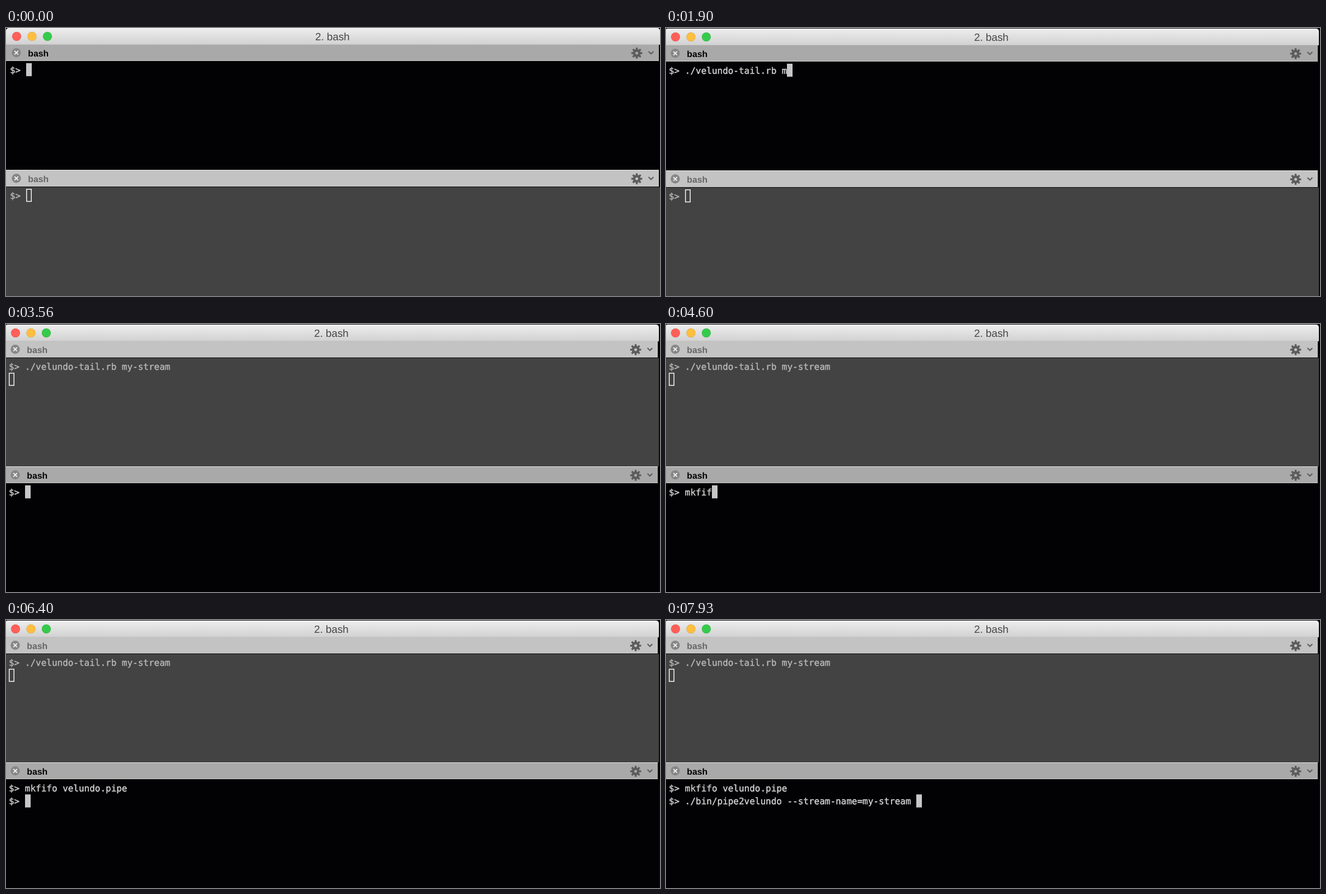
These frames come from a looping animation (1168 px wide and 480 px high, 8 s). An HTML page:

```html
<!DOCTYPE html>
<html lang="en">
<head>
<meta charset="utf-8">
<title>Terminal</title>
<style>
  html, body { margin: 0; width: 100%; height: 100%; overflow: hidden; background: #06070f; }
  svg { display: block; width: 1168px; height: 480px; }
  text { white-space: pre; text-rendering: geometricPrecision; }
  .title { font: 18.8px "Liberation Sans", Arial, sans-serif; fill: #464646; text-anchor: middle; }
  .label { font: bold 15.8px "Liberation Sans", Arial, sans-serif; fill: #666; }
  .line {
    font: 16px "DejaVu Sans Mono", monospace; letter-spacing: -0.02px;
    fill: #b9b9b9; stroke: #b9b9b9; stroke-width: 0.35;
  }
  .bg { fill: #434343; }
  .bar { fill: #c3c3c3; }
  .edge { fill: #c3c3c3; }
  .rule { fill: #0c0c0c; }
  .cursor { fill: none; stroke: #f4f4f4; stroke-width: 1.5; }
  .gear, .chevron { stroke: #5c5c5c; fill: none; }
  .active .bg { fill: #020204; }
  .active .bar { fill: #a9a9a9; }
  .active .edge { fill: #cfcfcf; }
  .active .label { fill: #000; }
  .active .line { fill: #d6d6d6; stroke: #d6d6d6; }
  .active .cursor { fill: #c7c7c7; stroke: #c7c7c7; }
</style>
</head>
<body>
<svg viewBox="0 0 1168 480">
  <defs>
    <linearGradient id="chrome" x2="0" y2="1">
      <stop offset="0" stop-color="#eeeeee"/>
      <stop offset="1" stop-color="#d1d1d1"/>
    </linearGradient>
  </defs>
  <g id="window">
    <g id="panes"></g>
    <path d="M-2 31V6a5 5 0 0 1 5-5H1161a5 5 0 0 1 5 5V31Z" fill="url(#chrome)"/>
    <path d="M3 1.5H1161" stroke="#f7f7f7"/>
    <path d="M-2 30.5H1166" stroke="#c4c4c4"/>
    <g id="lights"></g>
    <text class="title" x="581" y="22.5">2. bash</text>
  </g>
</svg>
<script>
const LOOP = 8000, CELL = 9.6, LEFT = 5, ROW = 23.4;
const NS = 'http://www.w3.org/2000/svg';

function add(parent, tag, attrs = {}, text = '') {
  const node = document.createElementNS(NS, tag);
  for (const key in attrs) node.setAttribute(key, attrs[key]);
  node.textContent = text;
  return parent.appendChild(node);
}

function makePane(top, height) {
  const g = add(document.getElementById('panes'), 'g', { transform: `translate(0 ${top})` });
  const rect = (cls, y, h, w = 1168) => add(g, 'rect', { class: cls, x: -2, y, width: w, height: h });
  rect('bg', 29, height - 29);
  add(g, 'rect', { x: 1164, y: -1, width: 4, height: 30, fill: '#000' });
  rect('bar', 0, 28, 1166);
  rect('edge', 28, 1, 1166);
  rect('rule', 29, 1);
  add(g, 'rect', { x: -2, y: -1, width: 1166, height: 1, fill: '#e6e6e6' });

  add(g, 'circle', { cx: 16.5, cy: 14.3, r: 8.2, fill: '#868686' });
  add(g, 'path', { d: 'M13.2 11l6.6 6.6m0-6.6l-6.6 6.6', stroke: '#ededed', 'stroke-width': 2 });
  add(g, 'text', { class: 'label', x: 37.3, y: 20.5 }, 'bash');

  const gear = add(g, 'g', { class: 'gear', transform: 'translate(1124.5 15)' });
  add(gear, 'circle', { r: 4.7, 'stroke-width': 4.4 });
  for (let i = 0; i < 8; i++)
    add(gear, 'path', { d: 'M0-6V-9.8', 'stroke-width': 3.4, transform: `rotate(${i * 45})` });
  add(g, 'path', { class: 'chevron', d: 'M1145.6 12l4.4 4.2 4.4-4.2', 'stroke-width': 2.1 });

  const lines = [0, 1].map(row => add(g, 'text', { class: 'line', x: LEFT, y: 51 + row * ROW }));
  const cursor = add(g, 'rect', { class: 'cursor', width: 8.5, height: 21.8 });

  return (active, rows, column, row) => {
    g.setAttribute('class', active ? 'active' : '');
    lines.forEach((line, i) => { line.textContent = rows[i] || ''; });
    cursor.setAttribute('x', Math.round(LEFT + column * CELL) + 0.75);
    cursor.setAttribute('y', 33.75 + row * ROW);
  };
}

['#ff5f58', '#ffbe3f', '#34cb4b'].forEach((fill, i) =>
  add(document.getElementById('lights'), 'circle',
    { cx: 17 + i * 27.5, cy: 16, r: 8, fill, stroke: '#000', 'stroke-opacity': 0.1 }));

const topPane = makePane(31, 225);
const bottomPane = makePane(256, 225);

const PROMPT = '$> ';
const TAIL = './velundo-tail.rb my-stream';
const PIPE = 'mkfifo velundo.pipe';
const RUN = './bin/pipe2velundo --stream-name=my-stream ';

// Typing bursts: [first ms, last ms, steps, characters before, characters after]
const tailBursts = [
  [530, 560, 2, 0, 2], [700, 895, 4, 2, 6], [960, 960, 1, 6, 10],
  [1230, 1526, 5, 10, 15], [1600, 1600, 1, 15, 18],
  [1900, 1960, 2, 18, 20], [2100, 2560, 7, 20, 27]
];
const pipeBursts = [[4430, 5100, 18, 0, 19]];
const runBursts = [[7030, 7400, 9, 0, 22], [7430, 7830, 9, 22, 38], [7860, 7930, 3, 38, 43]];

function typed(bursts, t) {
  let count = 0;
  for (const [start, end, steps, from, to] of bursts) {
    if (t < start) break;
    const gap = steps > 1 ? (end - start) / (steps - 1) : 1;
    const done = Math.min(steps, Math.floor((t - start) / gap + 1e-6) + 1);
    count = from + Math.round((to - from) * done / steps);
  }
  return count;
}

function render(t) {
  const switched = t >= 3560, second = t >= 6400;
  const shift = t < 500 ? 'translate(2 -1)' : '';
  document.getElementById('window').setAttribute('transform', shift);

  const tail = typed(tailBursts, t);
  topPane(!switched, [PROMPT + TAIL.slice(0, tail)], switched ? 0 : 3 + tail, switched ? 1 : 0);

  const pipe = typed(pipeBursts, t), run = typed(runBursts, t);
  const rows = [PROMPT + PIPE.slice(0, pipe)];
  if (second) rows.push(PROMPT + RUN.slice(0, run));
  bottomPane(switched, rows, 3 + (second ? run : pipe), second ? 1 : 0);
}

const begin = performance.now();
function tick() {
  render((performance.now() - begin) % LOOP);
  requestAnimationFrame(tick);
}
tick();
</script>
</body>
</html>
```
